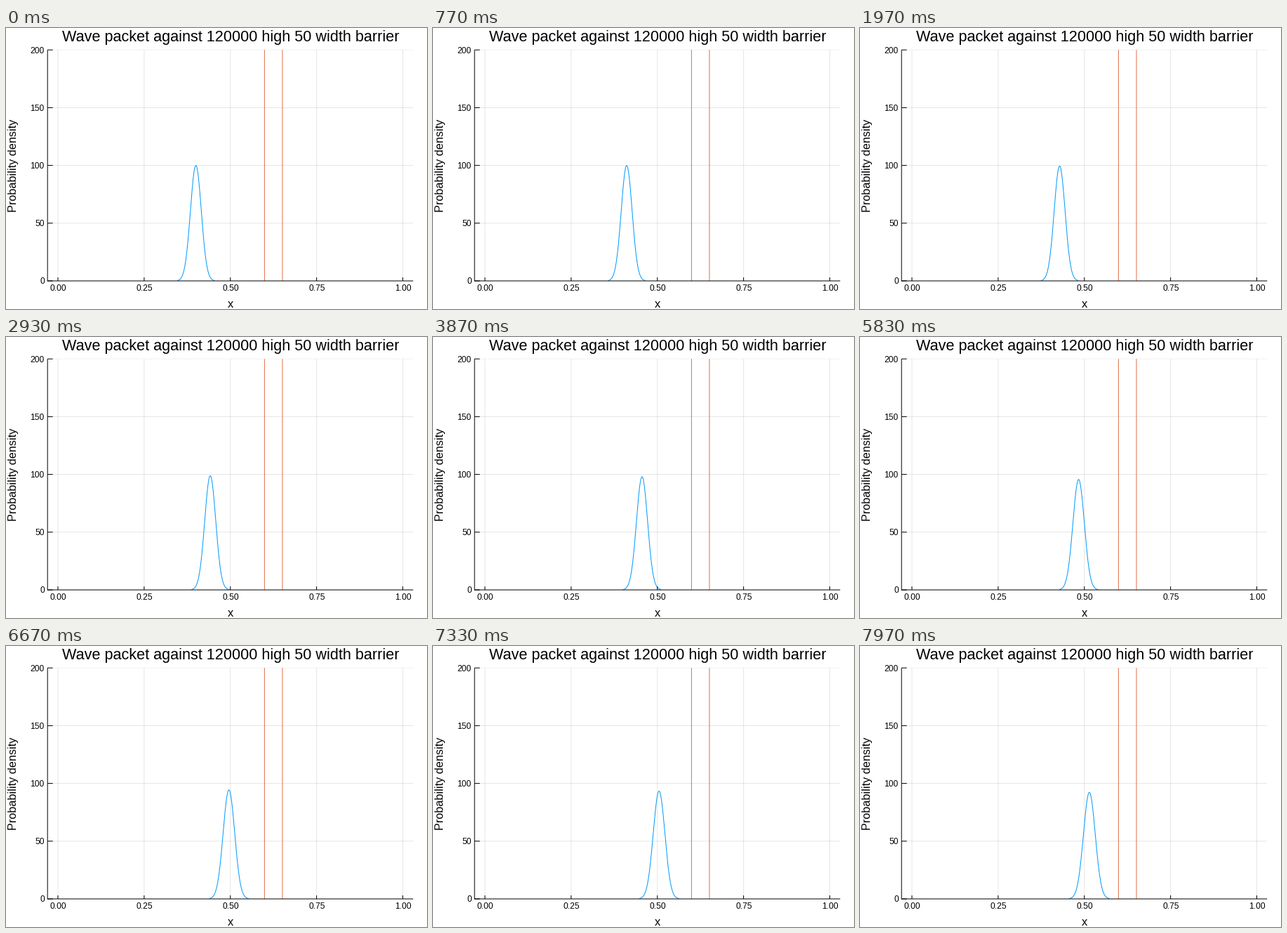
Animation of 600x400 px, one loop 8000 ms. Source, as a matplotlib script:

```python
import numpy as np
import matplotlib.pyplot as plt
from matplotlib.animation import FuncAnimation

plt.rcParams["font.family"] = "Liberation Sans"

W, H, DPI = 600, 400, 100
FRAMES, LOOP = 240, 8000
DX, DT = 0.001, 1e-6          # lattice spacing, time per frame
X0, K0, WIDTH = 0.4, 500, 0.001
HEIGHT = 120000
LEFT, RIGHT, TOP, BASE = 59.2, 580.3, 31.2, 360


def px(size):
    return size * 72 / DPI


def sx(x):
    return 74 + 491.5 * x


def sy(p):
    return BASE - (BASE - TOP) * p / 200


# Packet on a lattice, evolved exactly through the energy eigenstates
x = np.arange(1001) * DX
barrier = np.where((x > 0.5995) & (x < 0.6505), HEIGHT, 0)
hop = np.full(x.size - 1, -0.5 / DX**2)
ham = np.diag(1 / DX**2 + barrier) + np.diag(hop, 1) + np.diag(hop, -1)
energy, states = np.linalg.eigh(ham)
start = 10 * np.exp(-((x - X0) ** 2) / WIDTH + 1j * K0 * x)
coeff = states.T @ start


def density(n):
    psi = states @ (coeff * np.exp(-1j * energy * n * DT))
    return np.abs(psi) ** 2


fig = plt.figure(figsize=(W / DPI, H / DPI), dpi=DPI, facecolor="white")
ax = fig.add_axes([0, 0, 1, 1])
ax.set_xlim(0, W)
ax.set_ylim(H, 0)
ax.axis("off")


def line(xs, ys, color="black", width=1, **kw):
    return ax.plot(xs, ys, color=color, lw=px(width), snap=False,
                   solid_capstyle="butt", **kw)[0]


def label(x, y, text, size, ha="center", **kw):
    ax.text(x, y, text, fontsize=px(size), ha=ha, va="baseline", **kw)


for v in (0, 0.25, 0.5, 0.75, 1):
    line([sx(v)] * 2, [TOP, BASE], alpha=0.1, zorder=1)
    line([sx(v)] * 2, [BASE - 5, BASE], zorder=5)
    label(sx(v) + 0.4, 374.5, f"{v:.2f}", 12)

for v in (0, 50, 100, 150, 200):
    if v:
        line([LEFT, RIGHT], [sy(v)] * 2, alpha=0.05 if v == 200 else 0.1,
             zorder=1)
    line([LEFT, LEFT + 7.5], [sy(v)] * 2, zorder=5)
    label(54.8, sy(v) + 4.3, str(v), 12, ha="right")

line([LEFT, RIGHT], [BASE, BASE], zorder=5)
line([LEFT, LEFT], [TOP, BASE + 0.5], zorder=5)

for v in (0.599, 0.651):
    line([sx(v)] * 2, [TOP, BASE], "#E36F47", zorder=4)

label(320, 18.6, "Wave packet against 120000 high 50 width barrier", 21.6)
label(320, 398, "x", 16.4)
label(14.7, 195.5, "Probability density", 16.2, rotation=90,
      rotation_mode="anchor")

wave = line([], [], "#009AFA", zorder=3)


def update(n):
    p = density(n)
    # The flat part lies under the axis
    wave.set_data(sx(x), np.where(p > 0.25, sy(p), np.nan))
    return (wave,)


anim = FuncAnimation(fig, update, frames=FRAMES, interval=LOOP / FRAMES,
                     init_func=lambda: update(0), repeat=True,
                     repeat_delay=0, blit=False)
plt.show()
```
